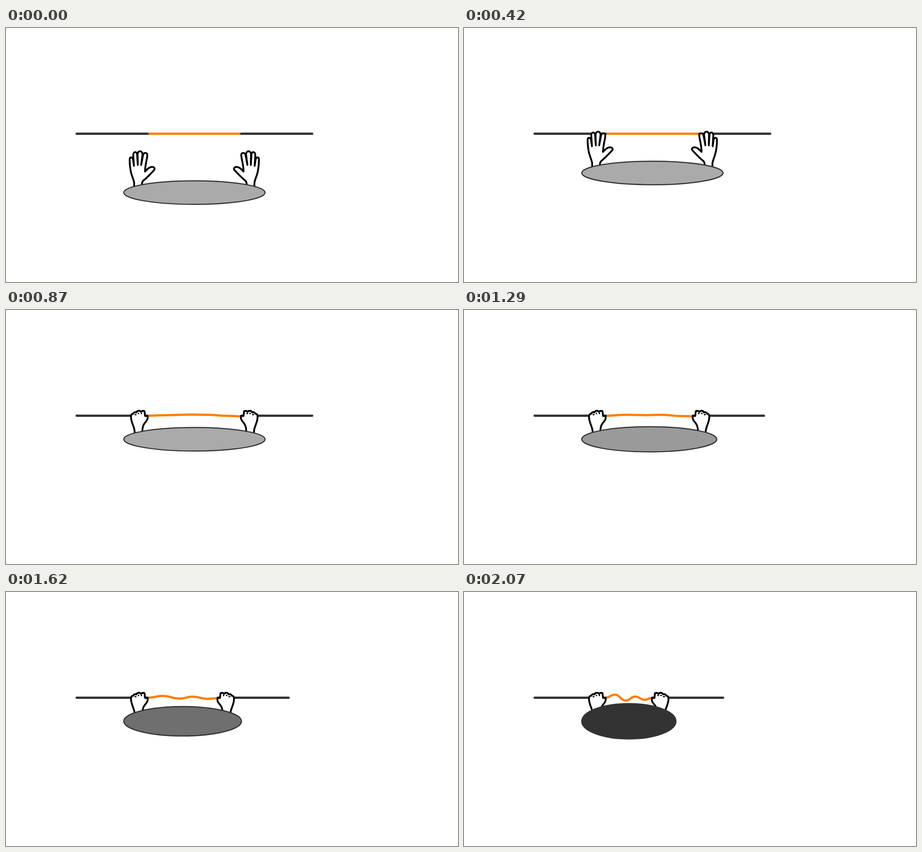
An HTML page for the animation above (2.97 s loop, 998 by 561 pixels).

```html
<!DOCTYPE html>
<html lang="en">
<head>
<meta charset="utf-8">
<title>Squeeze</title>
<style>
  html, body { margin: 0; width: 100%; height: 100%; overflow: hidden; background: #fff; }
  svg { display: block; width: 100vw; height: 100vh; }
  .rope { fill: none; stroke: #333; stroke-width: 5; stroke-linecap: round; }
  #band { stroke: #ff8000; stroke-linecap: butt; }
  .hand { fill: #fff; stroke: #000; stroke-width: 4; stroke-linejoin: round; }
  #blob { stroke: #333; stroke-width: 2.5; }
</style>
</head>
<body>
<svg viewBox="0 0 998 561">
  <defs>
    <path id="open" d="M283 354V343C283 336 277 327 275 314C273 303 273 297 273 291
      C273 284 279 284 280.5 291L282.5 304.500L281 281C281 272 289 272 289.500 280L291 302.500L290.500 279
      C291 270 301 270 301.500 279L298.500 302.500L302.500 281C304 274 313 274 312 282
      C311 292 307 303 307 317C310 314 314 309 319 307.500C326 305 331 310 326 315
      C320 321 311 331 305 335.500C301 338 300 341 300 346V354"/>
    <g id="fist">
      <path d="M284 276V270C284.500 258 276 250 276 236C276 230 278.500 229.500 281 229
        C282 225.500 285.500 225 288 226C290 221.500 296 221.500 298 225C300 222 306 222 306 224.500
        L307 234H312C314.500 240 311 244 306.500 249.500C302 255 301 260 301 268V276"/>
      <path d="M284 231h4M291 228.500h3M297.500 228.500h3" stroke-width="3"/>
    </g>
  </defs>
  <path id="band" class="rope"/>
  <path class="rope" d="M156 233.500H312.500"/>
  <path id="tail" class="rope" d="M519.500 233.500H676"/>
  <g class="hand">
    <use id="left"/>
    <use id="right"/>
  </g>
  <ellipse id="blob" cy="363.500"/>
</svg>
<script>
  const LOOP = 2970, STEP = 30;
  const [band, tail, left, right, blob] =
    ['band', 'tail', 'left', 'right', 'blob'].map(id => document.getElementById(id));

  // Band nodes: x and y when stretched, then x and y when slack
  const nodes = [
    [312.5, 233.5, 312.5, 233.5],
    [359, 232.2, 333, 226.7],
    [409, 231, 357, 239.8],
    [446, 231.5, 378, 231],
    [490, 233.8, 399, 238],
    [519.5, 234.8, 415.5, 234]
  ];

  const mix = (a, b, p) => a + (b - a) * p;
  const progress = (t, start, steps) =>
    Math.max(0, Math.min(steps, Math.floor((t - start) / STEP) + 1)) / steps;

  function wave(p) {
    const points = nodes.map(([x, y, x2, y2]) => [mix(x, x2, p), mix(y, y2, p)]);
    return points.map(([x, y], i) => {
      if (!i) return `M${x} ${y}`;
      const [px, py] = points[i - 1], mid = (x + px) / 2;
      return `C${mid} ${py} ${mid} ${y} ${x} ${y}`;
    }).join('');
  }

  function draw(t) {
    const lift = -78 * progress(t, 300, 9);
    const squeeze = progress(t, 1200, 30);
    const shift = -104 * squeeze;
    const gripped = t >= 870;
    const handY = gripped ? 0 : lift;

    for (const hand of [left, right]) hand.setAttribute('href', gripped ? '#fist' : '#open');
    left.setAttribute('transform', `translate(0 ${handY})`);
    right.setAttribute('transform', `translate(${831.5 + shift} ${handY}) scale(-1 1)`);

    tail.setAttribute('transform', `translate(${shift})`);
    band.setAttribute('d', gripped ? wave(squeeze) : 'M312.5 233.5H519.5');

    const gray = Math.round(mix(170, 51, squeeze));
    blob.setAttribute('transform', `translate(0 ${lift})`);
    blob.setAttribute('cx', 416 + shift / 2);
    blob.setAttribute('rx', 156 + shift / 2);
    blob.setAttribute('ry', mix(26, 39, squeeze));
    blob.setAttribute('fill', `rgb(${gray},${gray},${gray})`);
  }

  const start = performance.now();
  function tick() {
    draw((performance.now() - start) % LOOP);
    requestAnimationFrame(tick);
  }
  draw(0);
  requestAnimationFrame(tick);
</script>
</body>
</html>
```
